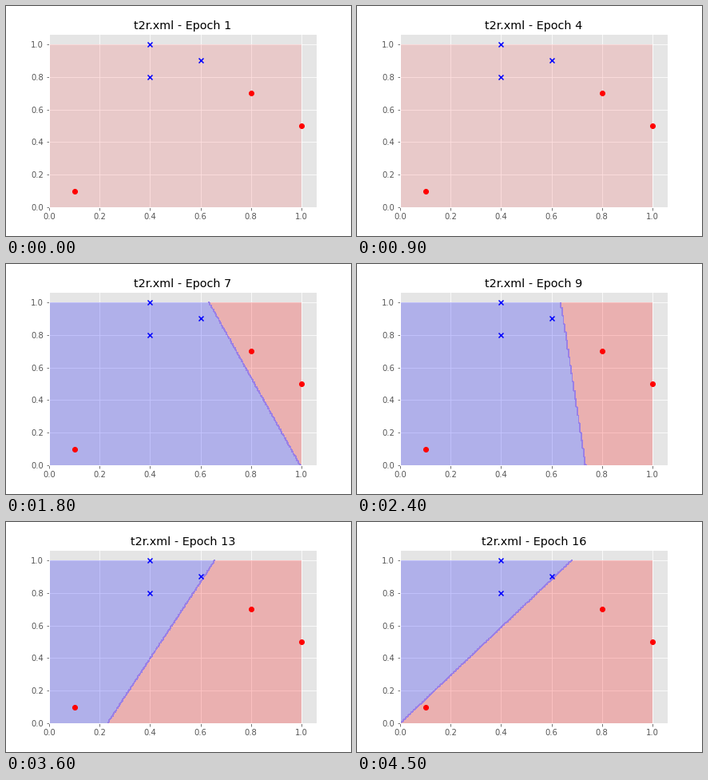
A matplotlib script that plays this animation: 432 by 288 pixels, repeating every 4.8 s.

```python
import numpy as np
import matplotlib.pyplot as plt
from matplotlib.animation import FuncAnimation

plt.style.use("ggplot")
plt.rcParams["font.family"] = "DejaVu Sans"

STEP_MS = 300
EPOCHS = 16
RED, BLUE = (1, 0, 0), (0, 0, 1)
SEAM = "#9a80e6"
FULL, PALE = 0.2256, 0.12      # fill opacity: two classes / nothing learned yet

ALL_RED, ALL_BLUE = None, (2, 2)
# Decision line per epoch: x where it meets y = 1 and y = 0.
LINES = [
    ALL_RED, ALL_RED, (0.53, 3.56), ALL_RED,
    (0.614, 1.63), ALL_BLUE, (0.634, 0.995), ALL_BLUE,
    (0.637, 0.735), (0.937, 0.835), (0.640, 0.491), (0.937, 0.56),
    (0.657, 0.231), (0.96, 0.263), (0.663, 0.0), (0.680, 0.0),
]

axis = np.linspace(0, 1, 201)
gx, gy = np.meshgrid(axis, axis)

fig, ax = plt.subplots(figsize=(6, 4), dpi=72)
fig.subplots_adjust(left=0.125, right=0.9, bottom=0.125, top=0.88)
ax.scatter([0.1, 0.8, 1.0], [0.1, 0.7, 0.5], s=36, c="r", marker="o",
           linewidths=1, zorder=3)
ax.scatter([0.4, 0.4, 0.6], [1.0, 0.8, 0.9], s=36, c="b", marker="x",
           linewidths=1.5, zorder=3)
ax.set_xticks(np.arange(0, 1.1, 0.2))
ax.set_yticks(np.arange(0, 1.1, 0.2))
title = ax.set_title("", color="black")
layers = []


def classify(line):
    """1 where a grid point lies on the blue side of the line."""
    if line is None:
        return np.zeros_like(gx)
    top, bottom = line
    return (gx <= bottom + (top - bottom) * gy).astype(float)


def draw(i):
    while layers:
        layers.pop().remove()
    line = LINES[i]
    z = classify(line)
    layers.append(ax.contourf(gx, gy, z, levels=[-0.5, 0.5, 1.5],
                              colors=[RED, BLUE],
                              alpha=PALE if line is None else FULL, zorder=1))
    if z.min() < z.max():
        layers.append(ax.contour(gx, gy, z, levels=[0.5], colors=[SEAM],
                                 linewidths=0.8, antialiased=False, zorder=1.1))
    ax.set_xlim(0, 1.06)
    ax.set_ylim(0, 1.066)
    title.set_text(f"t2r.xml - Epoch {i + 1}")
    return []


anim = FuncAnimation(fig, draw, frames=EPOCHS, interval=STEP_MS,
                     init_func=lambda: draw(0), repeat=True, repeat_delay=0)
plt.show()
```
